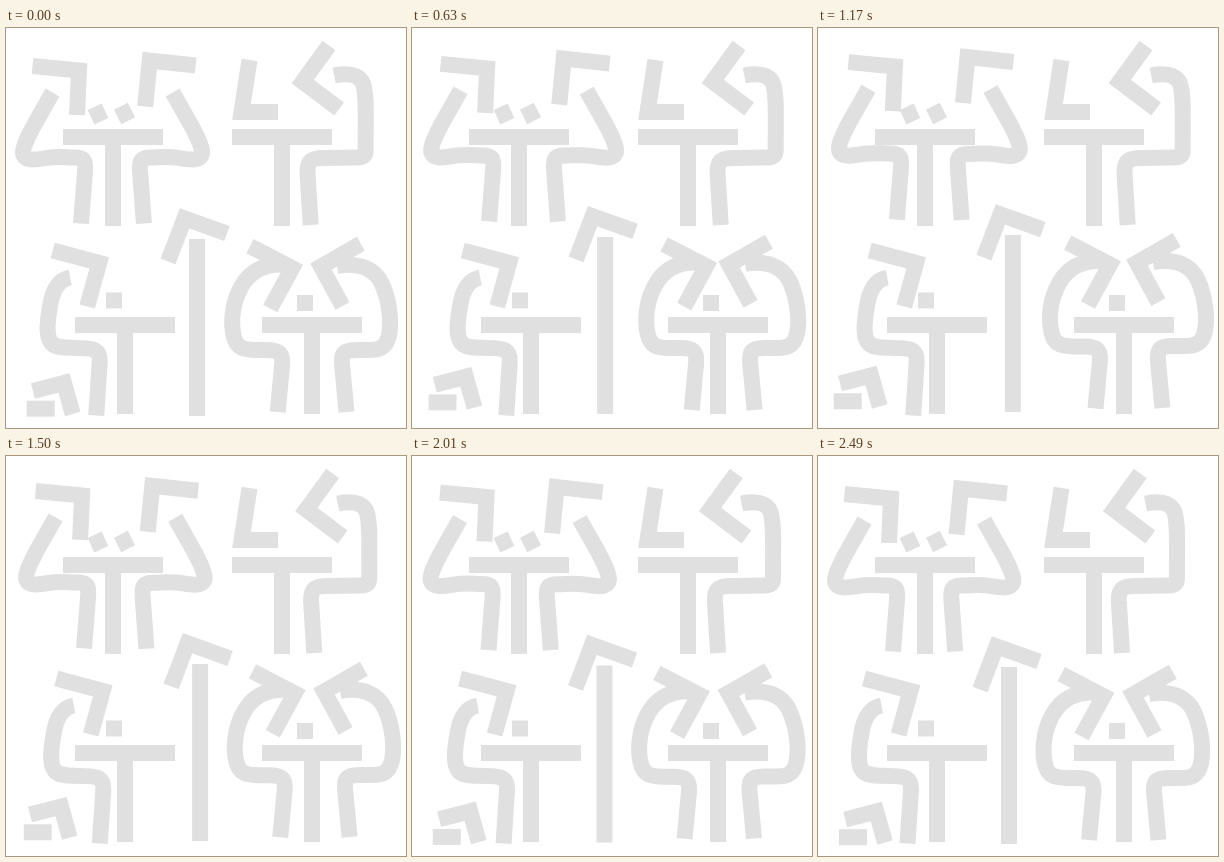
Recreate the animation shown at these times as an HTML page. Size 400 by 400 pixels, loop 2.69 s.

```html
<!DOCTYPE html>
<html lang="en">
<head>
<meta charset="utf-8">
<title>Drifting strokes</title>
<style>
html, body { margin: 0; width: 100%; height: 100%; overflow: hidden; background: #fff; }
svg { display: block; width: 100%; height: 100%; }
path { fill: none; stroke: #e0e0e0; stroke-width: 16; stroke-miterlimit: 10; }
</style>
</head>
<body>
<svg viewBox="0 0 400 400">
  <!-- fixed parts -->
  <path d="M57 109H157M107 117V198"/>
  <path d="M85 89.2L99 82.8M111.6 89L125.4 82"/>
  <path d="M226 109H326M276 117V198"/>
  <path d="M243.5 32L235.5 84H272"/>
  <path d="M69 297H169M119 305V386M100 272.5H116"/>
  <path d="M256 297H356M306 305V386M291 275H307"/>

  <g id="rise">
    <path d="M26.5 38L73 42.5L71 87"/>
    <path d="M46.5 64.5L27 99C17.5 117 16 124 17.5 127C20 133 29 132 40 130C52 128 60 129.5 68 129.5C78 129.5 80 132 79 144L75 195.5"/>
    <path d="M191 211V388"/>
    <path d="M221 205.5L178.5 190.3L162 233.5"/>
    <path d="M354.8 215.8L315 238.6L336.5 278"/>
    <path d="M331 238C354 234 369 241 376 256C384 274 385.5 295 383 307C380 321 372 322 362 322L350 322C337 322 335.5 326 336 336L340.5 384"/>
  </g>
  <g id="swing">
    <path d="M189 37.5L143 32.5L138.5 78.5"/>
    <path d="M166 64.5L185.4 99C194.9 117 196.4 124 194.9 127C192.4 133 183.4 132 172.4 130C160.4 128 152.4 129.5 144.4 129.5C134.4 129.5 132.4 132 133.4 144L137.2 195.5"/>
    <path d="M243.3 218.2L285.5 240L263.5 280.5"/>
    <path d="M276 236.5C256 236 243 244 235 258C225 275 224 295 227 308C230 321 238 321.5 248 322L260 322C273 322 276 326 275.5 336L271 384"/>
  </g>
  <g id="slide">
    <path d="M322.3 17.5L296 53.5L332.4 81"/>
    <path d="M327.5 47.5C340 45 350 46 355 53C361 62 358.5 95 359 122C359 128 357 129.5 350 129.5L318 130C304 130 300.5 133 300.8 145L304 197"/>
    <path d="M46 222.5L92.5 234.8L80.5 278.5"/>
    <path d="M63.5 249.5C50 252 45 265 43 280C40 298 40 308 44 314C49 321 60 319.5 72 320C88 320 93.5 322 93 334L89.5 387.5"/>
  </g>
  <g id="lift">
    <path d="M21 381.2H49"/>
    <path d="M27.3 363.5L58.3 355.5L67 386.5"/>
  </g>
</svg>
<script>
const LOOP = 2690, STEP = 30, END = 2490;
const $ = id => document.getElementById(id);

// Piecewise linear value through [time, value] keys
function track(t, keys) {
  for (let i = 1; i < keys.length; i++) {
    const [a, u] = keys[i - 1], [b, v] = keys[i];
    if (t <= b) return u + (v - u) * (t - a) / (b - a);
  }
  return keys[keys.length - 1][1];
}

const move = (id, x, y) =>
  $(id).setAttribute('transform', `translate(${x.toFixed(2)} ${y.toFixed(2)})`);

function draw(ms) {
  const t = Math.min(Math.floor(ms / STEP) * STEP, END);
  const rise = track(t, [[0, 0], [1200, 4], [END, 0]]);
  const push = track(t, [[0, .7], [670, 7], [1440, .2], [END, 0]]);
  const slide = track(t, [[0, .7], [935, 6.7], [END, 0]]);
  const lift = track(t, [[0, .5], [950, 10], [2000, .3], [END, 0]]);
  move('rise', rise, -rise);
  move('swing', rise + push, -rise * .9);
  move('slide', slide, 0);
  move('lift', -lift * .66, -lift);
}

let start = null;
function tick(now) {
  if (start === null) start = now;
  draw((now - start) % LOOP);
  requestAnimationFrame(tick);
}
draw(0);
requestAnimationFrame(tick);
</script>
</body>
</html>
```
